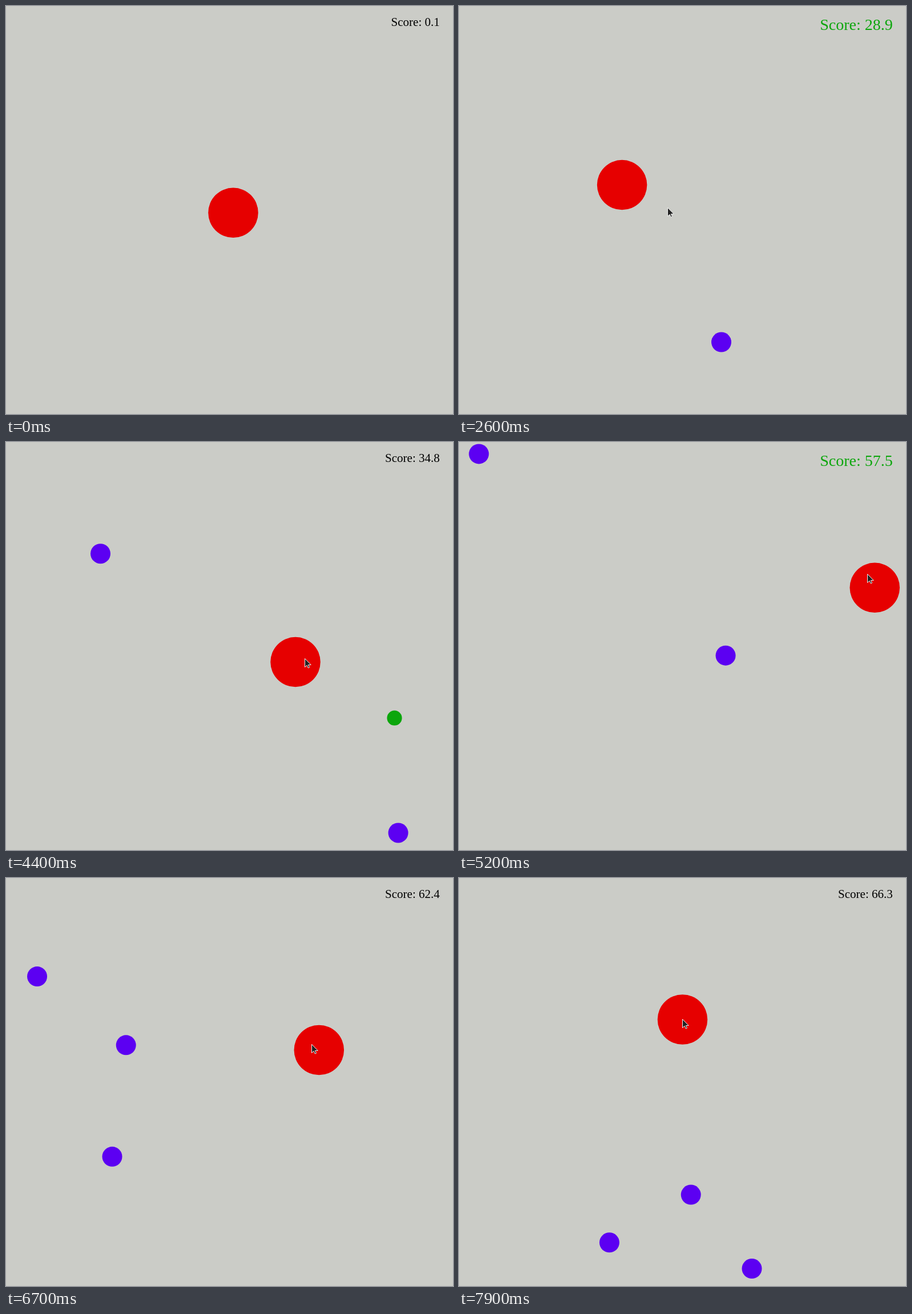
These frames come from a looping animation (783x715 px, 8 s). An HTML page with a canvas:

```html
<!DOCTYPE html>
<html>
<head>
<meta charset="utf-8">
<style>
html, body { margin: 0; height: 100%; overflow: hidden; background: #cbccc7; }
canvas { display: block; }
</style>
</head>
<body>
<canvas id="stage" width="783" height="715"></canvas>
<script>
const ctx = document.getElementById('stage').getContext('2d');
const LOOP = 8000, STEP = 100, MOVE_START = 1000;
const FLASH = 500;   // how long the score stays large after a meal
const LEAD = 80;     // the player trails the pointer by this time
const RED = '#e60000', PURPLE = '#5c00f2', GREEN = '#0ca60c';

// Turning points of the player: time, x, y
const path = [
  [900, 398, 362.3], [1200, 450, 130], [1400, 436, 177], [1750, 395, 220],
  [2150, 60, 600], [2450, 150, 270], [2600, 285.6, 313.6], [2800, 450, 400],
  [4400, 507, 385.6], [5050, 735, 290], [5900, 573.7, 116.4],
  [6500, 600, 430], [6700, 548.3, 301.5], [7900, 391.5, 248]
];

// Bodies start at (x, y) and keep their velocity; enemies bounce at -wall
const enemies = [
  { born: 1920, x: 570.6, y: 737.6, vx: -.16335, vy: -.2185, wall: [0, 7] },
  { born: 4270, x: 722.8, y: 735.5, vx: -.275, vy: -.3885, wall: [6, 18] },
  { born: 5944, x: -20, y: 364.7, vx: .2725, vy: .1635, wall: [20, 0] }
];
const foods = [
  { born: 1950, x: 70, y: 730, vx: 0, vy: -.3, eaten: 2200 },
  { born: 3500, x: 797.5, y: 735.7, vx: -.13, vy: -.28, eaten: 4750 }
];

function drift({ born, x, y, vx, vy }, t) {
  return [x + vx * (t - born), y + vy * (t - born)];
}

// Cubic curve through the turning points, at rest at both ends
function playerAt(time) {
  const last = path.length - 1;
  const t = Math.min(Math.max(time, path[0][0]), path[last][0]);
  let i = 0;
  while (i < last - 1 && t >= path[i + 1][0]) i++;
  const a = path[i], b = path[i + 1], span = b[0] - a[0], u = (t - a[0]) / span;
  const slope = (j, k) => {
    const p = path[j - 1], n = path[j + 1];
    return p && n ? (n[k] - p[k]) / (n[0] - p[0]) * span : 0;
  };
  return [1, 2].map(k => a[k] + (b[k] - a[k]) * u * u * (3 - 2 * u)
    + slope(i, k) * u * (1 - u) ** 2 - slope(i + 1, k) * u * u * (1 - u));
}

function disc([x, y], r, color) {
  ctx.fillStyle = color;
  ctx.beginPath();
  ctx.arc(x, y, r, 0, Math.PI * 2);
  ctx.fill();
}

const arrow = new Path2D('M0 0V15L3.6 11.8L5.8 16.5L8 15.5L5.9 11H10.7Z');
function pointer([x, y]) {
  ctx.save();
  ctx.translate(Math.round(x) - .5, Math.round(y) - .5);
  ctx.fillStyle = '#222';
  ctx.strokeStyle = '#eee';
  ctx.fill(arrow);
  ctx.stroke(arrow);
  ctx.restore();
}

function drawScore(t) {
  const meals = foods.filter(f => t >= f.eaten);
  const flash = meals.some(f => t < f.eaten + FLASH);
  const points = Math.min(.1 + .0035 * t, .408 + .00328 * t) + 20 * meals.length;
  const size = flash ? 28 : 21;
  ctx.font = size + 'px "Liberation Serif", "Times New Roman", serif';
  ctx.textAlign = 'right';
  ctx.fillStyle = flash ? GREEN : '#000';
  ctx.fillText('Score: ' + points.toFixed(1), 759.75, size + 13.5);
}

function draw(t) {
  ctx.fillStyle = '#cbccc7';
  ctx.fillRect(0, 0, 783, 715);

  disc(playerAt(t), 43.75, RED);
  for (const e of enemies) {
    if (t < e.born) continue;
    disc(drift(e, t).map((v, k) => Math.abs(v + e.wall[k]) - e.wall[k]), 17.5, PURPLE);
  }
  for (const f of foods) {
    if (t >= f.born && t < f.eaten) disc(drift(f, t), 13.1, GREEN);
  }
  drawScore(t);
  if (t >= MOVE_START) pointer(playerAt(t + LEAD));
}

const start = performance.now();
function tick() {
  const t = (performance.now() - start) % LOOP;
  draw(Math.floor(t / STEP) * STEP);
  requestAnimationFrame(tick);
}
tick();
</script>
</body>
</html>
```
